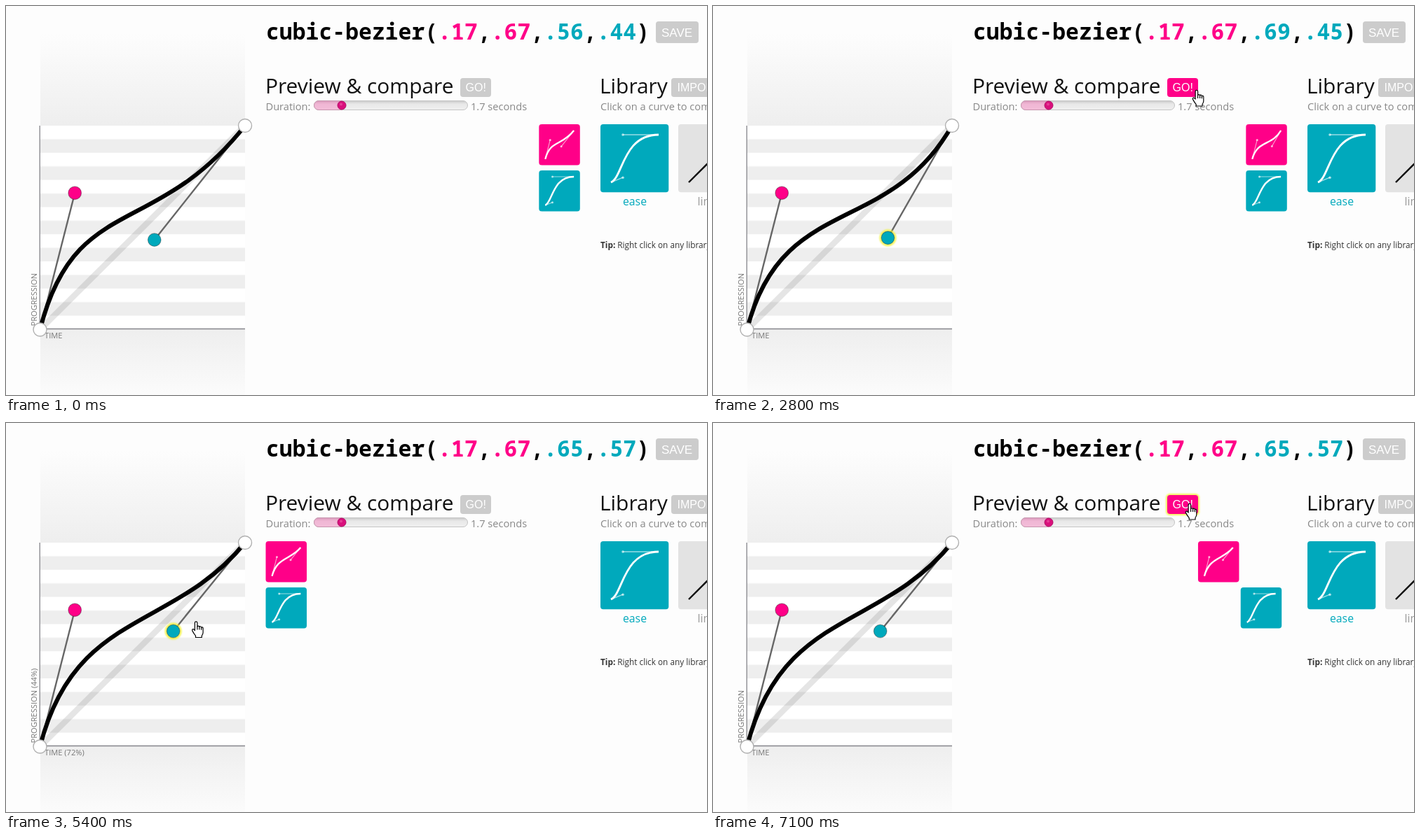
An HTML page that plays this animation: 1000 px wide and 556 px high, repeating every 7.2 s.

```html
<!DOCTYPE html>
<html lang="en">
<head>
<meta charset="utf-8">
<title>Cubic bezier editor</title>
<style>
  html, body { margin: 0; width: 100%; height: 100%; overflow: hidden; background: #fdfdfd; }
  svg { display: block; width: 1000px; height: 556px; }
  text { font-family: "Open Sans", "Noto Sans", sans-serif; white-space: pre; }
  .code { font: 700 31.45px "Noto Sans Mono", "DejaVu Sans Mono", monospace; }
  .head { font-size: 29.9px; fill: #111; }
  .note { font-size: 14.6px; fill: #888; }
  .axis { font-size: 11.1px; fill: #777; }
  .name { font-size: 15.8px; text-anchor: middle; }
  .tip { font-size: 11.8px; fill: #333; }
  .button rect { fill: #ccc; }
  .button text { font: 16px "Liberation Sans", Arial, sans-serif; fill: #fff; }
  .button .big { font-size: 17px; }
  .pink { fill: #f08; }
  .teal { fill: #00a9bc; }
  .handle { stroke: rgba(0, 0, 0, .3); stroke-width: 1.3; }
  .arm { stroke: #666; stroke-width: 2.4; }
  .end { fill: #fff; stroke: #b0b0b0; stroke-width: 1.4; }
  .glow { fill: none; stroke: #f4f434; stroke-width: 2.5; }
  .icon { fill: none; stroke: #fff; }
  .icon circle { fill: #fff; stroke: none; opacity: .65; }
  .icon .stick { opacity: .6; }
</style>
</head>
<body>
<svg viewBox="0 0 1000 556">
  <defs>
    <linearGradient id="above" x2="0" y2="1">
      <stop offset="0" stop-color="#eee" stop-opacity="0"/><stop offset="1" stop-color="#eee"/>
    </linearGradient>
    <linearGradient id="below" x2="0" y2="1">
      <stop offset="0" stop-color="#eee"/><stop offset="1" stop-color="#eee" stop-opacity="0.1"/>
    </linearGradient>
    <linearGradient id="groove" x2="0" y2="1">
      <stop offset="0" stop-color="#cacaca"/><stop offset=".35" stop-color="#e8e8e8"/><stop offset="1" stop-color="#f0f0f0"/>
    </linearGradient>
    <linearGradient id="filled" x2="0" y2="1">
      <stop offset="0" stop-color="#d99bbc"/><stop offset=".35" stop-color="#f0b6d4"/><stop offset="1" stop-color="#f3bdd9"/>
    </linearGradient>
    <pattern id="stripes" x="49" y="171" width="292" height="38.8" patternUnits="userSpaceOnUse">
      <rect width="292" height="19.4" fill="#fff"/><rect y="19.4" width="292" height="19.4" fill="#eee"/>
    </pattern>
    <filter id="soft" x="-30%" y="-30%" width="160%" height="160%"><feGaussianBlur stdDeviation="1"/></filter>
  </defs>

  <rect x="49" y="40" width="292" height="131" fill="url(#above)"/>
  <rect x="49" y="171" width="292" height="291" fill="url(#stripes)"/>
  <rect x="49" y="462" width="292" height="94" fill="url(#below)"/>
  <path d="M48.2 171V461.5H341" fill="none" stroke="#85858a" stroke-width="1.3"/>
  <text class="axis" id="timeLabel" x="55" y="475"></text>
  <text class="axis" id="progressLabel" transform="translate(44 457.5) rotate(-90)"></text>
  <path d="M48.5 462.5L341 171" stroke="#000" stroke-opacity=".1" stroke-width="8.5"/>
  <path class="arm" d="M48.5 462.5L98.2 267.2"/>
  <path class="arm" id="arm"/>
  <path id="curve" fill="none" stroke="#000" stroke-width="6"/>
  <circle class="end" cx="48.5" cy="462.5" r="9.5"/>
  <circle class="end" cx="341" cy="171" r="9.5"/>
  <circle class="handle pink" cx="98.2" cy="267.2" r="9.3"/>
  <g id="handle">
    <circle class="glow" id="handleGlow" r="10.6" filter="url(#soft)"/>
    <circle class="handle teal" r="9.3"/>
  </g>

  <text class="code" x="371" y="47.5">cubic-bezier(<tspan class="pink">.17</tspan>,<tspan class="pink">.67</tspan>,<tspan class="teal" id="codeX"></tspan>,<tspan class="teal" id="codeY"></tspan>)</text>
  <g class="button"><rect x="927" y="22" width="61" height="31" rx="4"/><text class="big" x="935" y="43.5">SAVE</text></g>

  <text class="head" x="370" y="125">Preview &amp; compare</text>
  <g class="button">
    <rect id="goGlow" class="glow" style="fill:none" x="647.5" y="102.5" width="45" height="28" rx="4" filter="url(#soft)"/>
    <rect id="go" x="648" y="103" width="44" height="27" rx="4"/><text x="655.5" y="122">GO!</text>
  </g>
  <text class="note" x="370.5" y="149">Duration:</text>
  <rect x="439.5" y="135.5" width="219" height="13" rx="6.5" fill="url(#groove)" stroke="#c4c4c4"/>
  <path d="M479 135.5H446a6.5 6.5 0 0 0 0 13H479z" fill="url(#filled)" stroke="#c795ae"/>
  <circle cx="479" cy="142" r="6" fill="#d9107c" stroke="#b10f68"/>
  <circle cx="478" cy="140.5" r="2" fill="#ec5aa8" opacity=".6"/>
  <text class="note" x="663" y="149">1.7 seconds</text>

  <text class="head" x="847" y="125">Library</text>
  <g class="button"><rect x="949" y="103" width="82" height="27" rx="4"/><text x="957.5" y="122">IMPORT</text></g>
  <text class="note" x="848" y="149">Click on a curve to compare it</text>
  <g transform="translate(848 169)"><rect class="teal" width="97.3" height="97.3" rx="4"/><g class="icon" id="easeBig"></g></g>
  <g transform="translate(959 169)"><rect fill="#e3e3e3" width="97.3" height="97.3" rx="4"/><path d="M15 83L83 15" stroke="#000" stroke-width="2.4"/></g>
  <text class="name teal" x="897" y="285">ease</text>
  <text class="name" x="1007.5" y="285" fill="#999">linear</text>
  <text class="tip" x="848" y="346"><tspan font-weight="700">Tip:</tspan> Right click on any library curve</text>

  <g id="currentBox"><rect class="pink" width="58.5" height="58.5" rx="4"/><g class="icon" id="currentIcon" transform="scale(.6)"></g></g>
  <g id="easeBox"><rect class="teal" width="58.5" height="58.5" rx="4"/><g class="icon" id="easeIcon" transform="scale(.6)"></g></g>

  <g fill="#fff" stroke="#000" stroke-width="1.2" stroke-linejoin="round">
    <path id="arrow" d="M.6 .6V16.6L4.2 13.1L6.7 18.6L9.4 17.4L7 12H11.8Z"/>
    <g id="hand">
      <path d="M-1.9 13V2Q-1.9.4-.2.4T1.6 2V8Q1.6 6.6 3 6.6T4.6 8Q4.8 7 6 7.2T7.4 8.8Q7.8 8 8.8 8.4T9.8 10V16Q9.8 18 8 20.5V23H-.8V20.6Q-3.2 17.8-5.4 13.6C-6.5 11.5-4.2 10.3-3 11.8Z"/>
      <path d="M1.6 8V12M4.6 8V12M7.4 9V12.3" fill="none"/>
    </g>
  </g>
</svg>

<script>
const LOOP = 7200, STEP = 100, DURATION = 1700;
const GO_CLICKS = [3174, 5706];
const HOLDS = [[1000, 2400], [4800, 5400]];
const LEFT = 370.5, RIGHT = 760.3;
const EASE = [.25, .1, .25, 1];
const $ = id => document.getElementById(id);

// Keys are [time, x, y]
const handleKeys = [[1100, .558, .44], [2300, .687, .45], [4900, .687, .45], [5300, .65, .566]];
const cursorKeys = [
  [300, 1000, 548], [900, 226.5, 329], [1000, 219, 332], [1100, 211.5, 334],
  [2300, 249.5, 331], [2400, 249.5, 331], [2800, 690, 120], [3100, 670, 115],
  [4100, 670, 115], [4800, 256.8, 333], [4900, 249.5, 331], [5300, 238.6, 297],
  [5350, 238.6, 297], [5650, 680, 115]
];

const planeX = x => 48.5 + 292.5 * x;
const planeY = y => 462.5 - 291.5 * y;
const smooth = p => p * p * (3 - 2 * p);
const decimals = v => v.toFixed(2).slice(1);

function at(keys, t) {
  const i = keys.findIndex(k => k[0] > t);
  if (i === 0) return keys[0].slice(1);
  if (i < 0) return keys[keys.length - 1].slice(1);
  const [a, b] = [keys[i - 1], keys[i]];
  const p = smooth((t - a[0]) / (b[0] - a[0]));
  return [1, 2].map(n => a[n] + (b[n] - a[n]) * p);
}

function bezier([x1, y1, x2, y2], x) {
  if (x <= 0 || x >= 1) return x <= 0 ? 0 : 1;
  const axis = (s, a, b) => 3 * (1 - s) ** 2 * s * a + 3 * (1 - s) * s * s * b + s ** 3;
  let low = 0, high = 1;
  for (let i = 0; i < 24; i++) {
    const mid = (low + high) / 2;
    if (axis(mid, x1, x2) < x) low = mid; else high = mid;
  }
  return axis(low, y1, y2);
}

function icon([x1, y1, x2, y2], width) {
  const p = (x, y) => `${15 + 68 * x} ${83 - 68 * y}`;
  const dot = (x, y) => `<circle cx="${15 + 68 * x}" cy="${83 - 68 * y}" r="${width * .65}"/>`;
  return `<path class="stick" stroke-width="${width * .5}" d="M15 83L${p(x1, y1)}M83 15L${p(x2, y2)}"/>`
    + dot(x1, y1) + dot(x2, y2)
    + `<path stroke-width="${width}" d="M15 83C${p(x1, y1)} ${p(x2, y2)} 83 15"/>`;
}

const show = (id, on) => $(id).setAttribute("visibility", on ? "visible" : "hidden");
const move = (id, x, y) => $(id).setAttribute("transform", `translate(${x} ${y})`);
const curveAt = t => [.17, .67, ...at(handleKeys, t)];

function boxX(t, curveOf) {
  const [out, back] = GO_CLICKS;
  const start = t < back ? out : back;
  const p = bezier(curveOf(start), (t - start) / DURATION);
  return t < back ? RIGHT + (LEFT - RIGHT) * p : LEFT + (RIGHT - LEFT) * p;
}

function drawLabels(t, hold) {
  const [x, y] = at(cursorKeys, hold ? hold[0] : t);
  const inside = t >= 300 && x >= 48 && x <= 341;
  const suffix = v => inside ? ` (${Math.round(v * 100)}%)` : "";
  $("timeLabel").textContent = "TIME" + suffix((x - 47) / 292);
  $("progressLabel").textContent = "PROGRESSION" + suffix((462.5 - y) / 291.5);
}

function draw(t) {
  const curve = curveAt(t);
  const hx = planeX(curve[2]), hy = planeY(curve[3]);
  $("curve").setAttribute("d", `M48.5 462.5C98.2 267.2 ${hx} ${hy} 341 171`);
  $("arm").setAttribute("d", `M341 171L${hx} ${hy}`);
  move("handle", hx, hy);
  $("codeX").textContent = decimals(curve[2]);
  $("codeY").textContent = decimals(curve[3]);
  $("currentIcon").innerHTML = icon(curve, 3.9);
  move("currentBox", boxX(t, curveAt), 169);
  move("easeBox", boxX(t, () => EASE), 235);

  const hold = HOLDS.find(([a, b]) => t >= a && t <= b);
  const [cx, cy] = at(cursorKeys, t);
  const overGo = cx >= 648 && cx <= 692 && cy >= 103 && cy <= 130;
  const goFocus = t >= GO_CLICKS[1] || (t >= GO_CLICKS[0] && t < HOLDS[1][0]);
  show("handleGlow", t >= HOLDS[0][0] && !goFocus);
  show("goGlow", goFocus);
  $("go").style.fill = overGo ? "#f08" : "#ccc";

  const pointing = Boolean(hold) || overGo;
  show("hand", pointing);
  show("arrow", t >= 300 && !pointing);
  move("hand", cx, cy);
  move("arrow", cx, cy);
  drawLabels(t, hold);
}

$("easeBig").innerHTML = icon(EASE, 2.8);
$("easeIcon").innerHTML = icon(EASE, 3.9);

const start = performance.now();
function tick(now) {
  const t = Math.max(0, now - start) % LOOP;
  draw(Math.floor(t / STEP) * STEP);
  requestAnimationFrame(tick);
}
draw(0);
requestAnimationFrame(tick);
</script>
</body>
</html>
```
